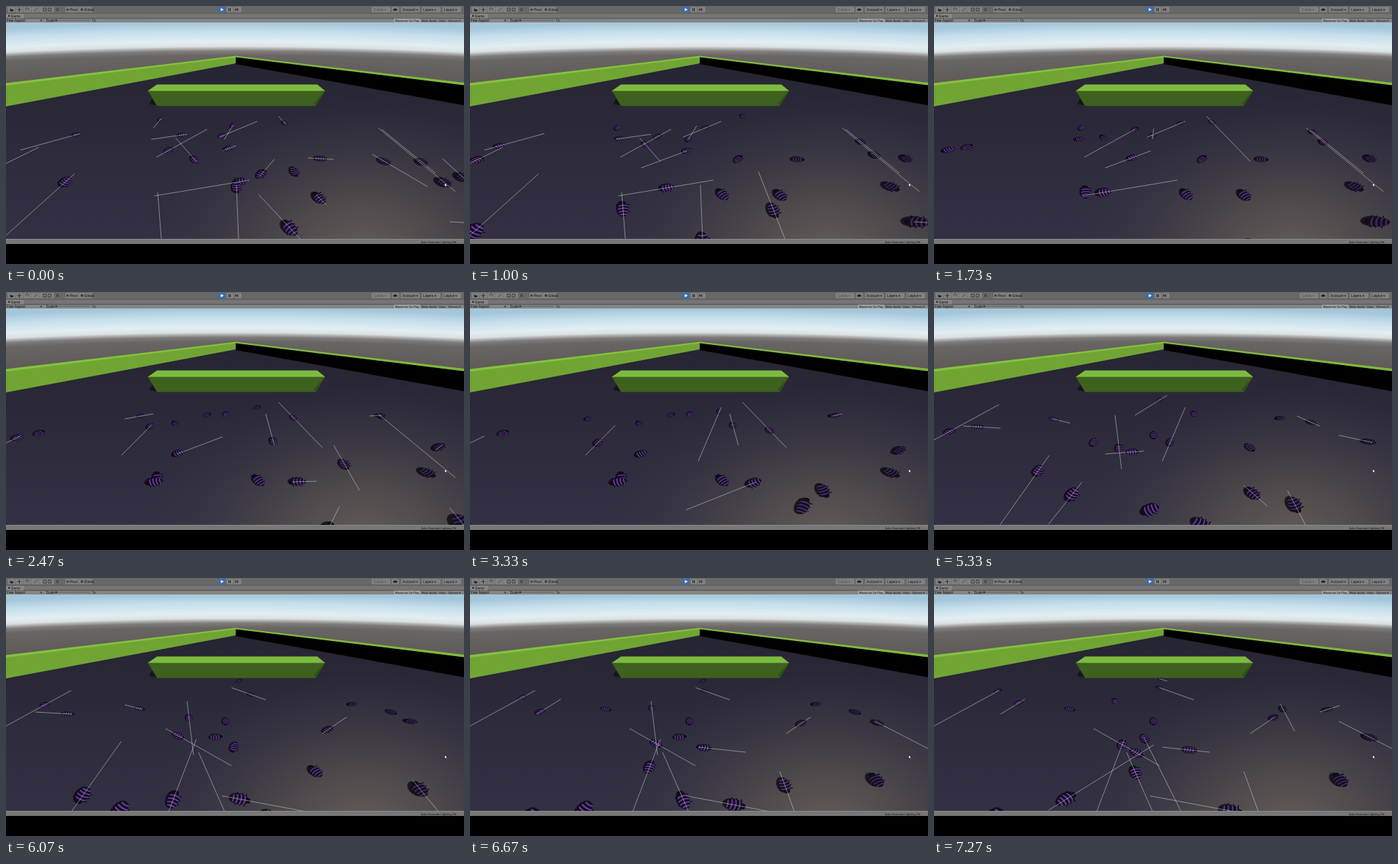
Recreate the animation shown at these times as an HTML page with a canvas. Size 640 by 360 pixels, loop 7340 ms.

```html
<!DOCTYPE html>
<html lang="en">
<head>
<meta charset="utf-8">
<title>Beetles wandering</title>
<style>
  html, body { margin: 0; width: 100%; height: 100%; overflow: hidden; background: #000; }
  svg, canvas { position: absolute; left: 0; top: 0; width: 640px; height: 360px; }
  text { font: 4.9px Roboto, Arial, sans-serif; fill: #161616; }
  .small text, text.small { font-size: 4.2px; }
</style>
</head>
<body>
<svg viewBox="0 0 640 360">
  <defs>
    <radialGradient id="sky" gradientUnits="userSpaceOnUse" cx="320" cy="6462" r="6439" fr="6350">
      <stop offset="0" stop-color="#5b5754"/>
      <stop offset=".48" stop-color="#696563"/>
      <stop offset=".55" stop-color="#7e7c7b"/>
      <stop offset=".585" stop-color="#a8a8a8"/>
      <stop offset=".625" stop-color="#dbe1e2"/>
      <stop offset=".7" stop-color="#e2eef2"/>
      <stop offset=".86" stop-color="#c5dfeb"/>
      <stop offset="1" stop-color="#a4c6da"/>
    </radialGradient>
    <linearGradient id="floor" x1="0" y1="0" x2="0" y2="1">
      <stop offset="0" stop-color="#262532"/>
      <stop offset=".5" stop-color="#2d2b3c"/>
      <stop offset="1" stop-color="#323043"/>
    </linearGradient>
    <radialGradient id="glare" gradientUnits="userSpaceOnUse" cx="0" cy="0" r="1" gradientTransform="translate(500 345) scale(310 220)">
      <stop offset="0" stop-color="#655d58"/>
      <stop offset=".35" stop-color="#554f4e" stop-opacity=".8"/>
      <stop offset=".7" stop-color="#454148" stop-opacity=".4"/>
      <stop offset="1" stop-color="#353242" stop-opacity="0"/>
    </radialGradient>
  </defs>

  <rect y="23" width="640" height="302" fill="url(#sky)"/>
  <path d="M320 80L0 140V325H640V138Z" fill="url(#floor)"/>
  <path d="M320 80L0 140V325H640V138Z" fill="url(#glare)"/>
  <path d="M321 71L0 109V140L321 80Z" fill="#71a533"/>
  <path d="M321 69.500L0 107.500V111L321 71.500Z" fill="#84c140"/>
  <path d="M321 71L640 110V138.500L321 81Z" fill="#000"/>
  <path d="M321 69.500L640 107V110.500L321 71.500Z" fill="#7fba3d"/>
  <path d="M204 129L200 137L213 139Z" fill="#15151b"/>
  <path d="M198 118H446L433 139.500H211Z" fill="#3e611d"/>
  <path d="M446 118L433 139.500L430 136Z" fill="#2f4d17"/>
  <path d="M211 109.500H435L446 118.500H198Z" fill="#7cbb3f"/>

  <rect width="640" height="10" fill="#686868"/>
  <rect y="10" width="640" height="7" fill="#757575"/>
  <path d="M0 10.300H640M0 17H640" stroke="#545454" stroke-width=".7"/>
  <rect y="17.400" width="640" height="5.600" fill="#858585"/>
  <rect y="11" width="25" height="6" fill="#878787"/>
  <g id="tools" fill="#818181"></g>
  <rect x="296" y="1" width="11" height="8" fill="#3d6ca8"/>
  <path d="M300 2.800L304.500 5L300 7.200Z" fill="#e8f1ff"/>
  <path d="M311.500 3V7M313.500 3V7M323.800 3V7" stroke="#222"/>
  <path d="M320.500 3L323 5L320.500 7Z" fill="#222"/>
  <path d="M5 5.500L7 3V5L9 4.500L11 5.500L9 7.500H7Z" fill="#222"/>
  <path d="M15.500 5H21.500M18.500 2V8M28 6A2 2 0 1 1 31 6M39.500 7L43.500 3M52 3H56V7H52ZM59 3H63V7H59ZM70 3L74 7M74 3L70 7" fill="none" stroke="#292929" stroke-width=".8"/>
  <circle cx="86" cy="5" r="1.500" fill="#333"/>
  <circle cx="106" cy="5" r="1.700" fill="#333"/>
  <path d="M541.500 6.500A1 1 0 0 1 542 4.500A2 2 0 0 1 545.500 4A1.300 1.300 0 0 1 546 6.500Z" fill="#222"/>
  <path d="M3 12.500H5.500V15H3Z" fill="#333"/>
  <path d="M69 20H118" stroke="#555" stroke-width=".8"/>
  <circle cx="70" cy="20" r="1.400" fill="#333"/>
  <rect x="542" y="17.600" width="37" height="5.200" fill="#a0a0a0"/>
  <text x="89" y="6.800">Pivot</text><text x="109" y="6.800">Global</text>
  <text x="514" y="6.800" opacity=".45">Collab ▾</text>
  <text x="554" y="6.800">Account ▾</text><text x="583" y="6.800">Layers ▾</text><text x="612" y="6.800">Layout ▾</text>
  <text x="7" y="15.500">Game</text>
  <text x="1" y="21.800">Free Aspect</text><text x="48" y="21.800">▾</text>
  <text x="56" y="21.800">Scale</text><text x="120" y="21.800">1x</text>
  <g class="small">
    <text x="544" y="21.700">Maximize On Play</text><text x="581" y="21.700">Mute Audio</text>
    <text x="605" y="21.700">Stats</text><text x="618" y="21.700">Gizmos ▾</text>
  </g>
  <rect y="325" width="640" height="7" fill="#777"/>
  <path d="M0 325.400H640" stroke="#929292" stroke-width=".8"/>
  <text class="small" x="580" y="330.500">Auto Generate Lighting Off</text>
  <rect y="332" width="640" height="28" fill="#000"/>
</svg>
<canvas width="640" height="360"></canvas>

<script>
const LOOP = 7.34, STEP = LOOP / 110;
const HORIZON = 62, CENTER = 320, DEPTH = 185; // camera
const SPEED = .28, REST = .2;                  // ground units per second, seconds
const ctx = document.querySelector('canvas').getContext('2d');
const tools = document.getElementById('tools');

const button = (x, w) => {
  const r = document.createElementNS('http://www.w3.org/2000/svg', 'rect');
  for (const [k, v] of Object.entries({ x, y: 1.2, width: w, height: 7.6, rx: 1 })) r.setAttribute(k, v);
  tools.append(r);
};
for (let i = 0; i < 6; i++) button(2.5 + i * 10.9, 10.3);
for (const x of [308, 319, 539]) button(x, 10);
for (const x of [511, 552, 581, 610]) button(x, 26);
for (const x of [83, 102]) button(x, 18.5);

const mix = (a, b, u) => a + (b - a) * u;
const toGround = ([x, y]) => [(x - CENTER) / (y - HORIZON), DEPTH / (y - HORIZON)];
const toScreen = ([gx, gz]) => [CENTER + gx * DEPTH / gz, HORIZON + DEPTH / gz];

// A beetle visits points [x, y, departure]; without a departure it leaves after a short rest.
// Every walk is straight and at the same ground speed, so arrivals follow from the distance.
const beetles = [];
function beetle(x, y, ...stops) {
  let from = [x, y], arrival = 0;
  beetles.push(stops.map(([tx, ty, start = arrival + REST]) => {
    const to = [tx, ty], a = toGround(from), b = toGround(to);
    arrival = start + Math.hypot(b[0] - a[0], b[1] - a[1]) / SPEED;
    const walk = { from, to, a, b, start, end: arrival };
    from = to;
    return walk;
  }));
}

// left side
beetle(104, 178, [20, 201, -.1], [-80, 250, 2.4], [91, 157, 3.75]);
beetle(-90, 264, [46, 197, -.05], [41, 187, 3.6], [93, 190], [127, 169, 6.55]);
beetle(96, 234, [-20, 338, -.25]);
beetle(217, 157, [206, 170, -.1], [166, 177, 2], [190, 183, 5.2]);
beetle(253, 179, [203, 186, -.2], [161, 228, 2.4], [85, 335, 4.8]);
beetle(340, 243, [207, 265, -.25], [160, 324, 5], [307, 233, 7]);
beetle(221, 375, [212, 260, -.05], [262, 247, 3.5], [253, 172]);
beetle(195, 410, [266, 225, 5.3]);

// middle
beetle(210, 211, [281, 172, -.4], [326, 144, 3.45], [314, 140, 6.8]);
beetle(266, 217, [237, 184, -.1], [223, 210, 3.3], [315, 262, 5.45]);
beetle(298, 183, [351, 161, -.15], [319, 236, 2.9], [385, 243, 6.5]);
beetle(317, 167, [305, 186, 0], [307, 171, 1.5], [307, 200, 3.5]);
beetle(321, 195, [303, 202, -.3], [239, 226, 1], [293, 222, 4.45], [355, 345, 7.2]);
beetle(391, 165, [381, 154, -.1], [442, 217, 1.1], [476, 194, 5.75]);
beetle(354, 238, [375, 214, -.1], [363, 170, 2.3], [315, 153, 5.3]);
beetle(322, 250, [327, 375, -.05], [269, 243, 6]);
beetle(403, 231, [446, 340, .05], [466, 299, 2.4], [433, 270, 5], [462, 350, 6.4]);
beetle(411, 325, [353, 263, -.2], [358, 316, 3.6], [374, 325, 4.8], [340, 350, 5.85]);

// right side
beetle(422, 212, [458, 214, -.4], [494, 277, 1.8], [545, 375, 5]);
beetle(447, 277, [434, 264, -.15], [400, 265, 2], [302, 304, 3.2], [425, 327, 5.7]);
beetle(512, 207, [589, 252, -.3], [665, 296, 3.7]);
beetle(645, 375, [568, 282, 5.3]);
beetle(600, 233, [525, 172, -.4], [508, 173, 2.4], [484, 176, 4.1], [504, 214, 6.9]);
beetle(628, 259, [520, 170, -.25], [507, 173], [539, 187, 4.8], [567, 178, 6.75]);
beetle(643, 243, [610, 213, -.1], [600, 221, 2.2], [613, 210, 3.5], [566, 200, 5.2], [640, 238, 6.6]);
beetle(700, 306, [620, 301, 0], [660, 350, 2.2]);

function poseAt(walks, t) {
  const walk = walks.findLast(w => w.start <= t) || walks[0];
  const u = Math.min(1, Math.max(0, (t - walk.start) / (walk.end - walk.start)));
  const [x, y] = toScreen(walk.a.map((v, i) => mix(v, walk.b[i], u)));
  return { x, y, walk, walking: t >= walk.start && t < walk.end };
}

function ellipse(x, y, rx, ry, color) {
  ctx.fillStyle = color;
  ctx.beginPath();
  ctx.ellipse(x, y, rx, ry, 0, 0, 7);
  ctx.fill();
}

function drawBeetle({ x, y, walk }) {
  const size = .11 * (y - HORIZON), tilt = Math.min(1, (y - HORIZON) / 283);
  const flat = Math.sqrt(mix(.3, 1, tilt * tilt));
  const stretch = 1 + .35 * ((x - CENTER) / 320) ** 2;
  const angle = Math.atan2((walk.to[1] - walk.from[1]) / flat, (walk.to[0] - walk.from[0]) / stretch);
  const dim = Math.min(1, Math.max(0, (x - 300) / 300));
  ctx.save();
  ctx.translate(x, y);
  ctx.scale(size * stretch, size * flat);
  ctx.save();
  ctx.translate(-.07 - .12 * dim, -.03);
  ctx.rotate(angle);
  ellipse(0, 0, .52, .32, 'rgba(5,4,9,.7)');
  ctx.restore();
  ctx.rotate(angle);

  ctx.strokeStyle = '#0b0812';
  ctx.lineWidth = .05;
  ctx.beginPath();
  for (const px of [-.2, .05, .28]) {
    ctx.moveTo(px, -.36);
    ctx.lineTo(px, .36);
  }
  ctx.stroke();
  ellipse(.43, 0, .11, .15, '#0c0914');
  ellipse(-.02, 0, .48, .29, '#140d22');
  ctx.clip();
  ctx.strokeStyle = `rgba(${mix(122, 100, dim)},${mix(68, 66, dim)},${mix(178, 132, dim)},${mix(.85, .5, dim)})`;
  ctx.lineWidth = .075;
  ctx.beginPath();
  for (let px = -.36; px < .3; px += .2) {
    ctx.moveTo(px - .05, -.31);
    ctx.quadraticCurveTo(px + .09, 0, px - .05, .31);
  }
  ctx.stroke();
  ctx.restore();
}

function drawCursor() {
  const pointer = new Path2D('M613 247V252L614.2 251L615 252.600L616 252L615.2 250.600L616.8 250.400Z');
  ctx.fillStyle = '#fff';
  ctx.strokeStyle = '#111';
  ctx.lineWidth = .5;
  ctx.fill(pointer);
  ctx.stroke(pointer);
}

function draw(t) {
  ctx.clearRect(0, 0, 640, 360);
  ctx.save();
  ctx.beginPath();
  ctx.rect(0, 23, 640, 302);
  ctx.clip();
  const poses = beetles.map(walks => poseAt(walks, t)).sort((a, b) => a.y - b.y);
  poses.forEach(drawBeetle);
  ctx.strokeStyle = 'rgba(222,219,212,.68)';
  ctx.lineWidth = .75;
  ctx.beginPath();
  for (const { walk, walking } of poses) {
    if (!walking) continue;
    ctx.moveTo(...walk.from);
    ctx.lineTo(...walk.to);
  }
  ctx.stroke();
  drawCursor();
  ctx.restore();
}

const origin = performance.now();
function tick() {
  const t = (performance.now() - origin) / 1000 % LOOP;
  draw(Math.floor(t / STEP + .05) * STEP);
  requestAnimationFrame(tick);
}
tick();
</script>
</body>
</html>
```
